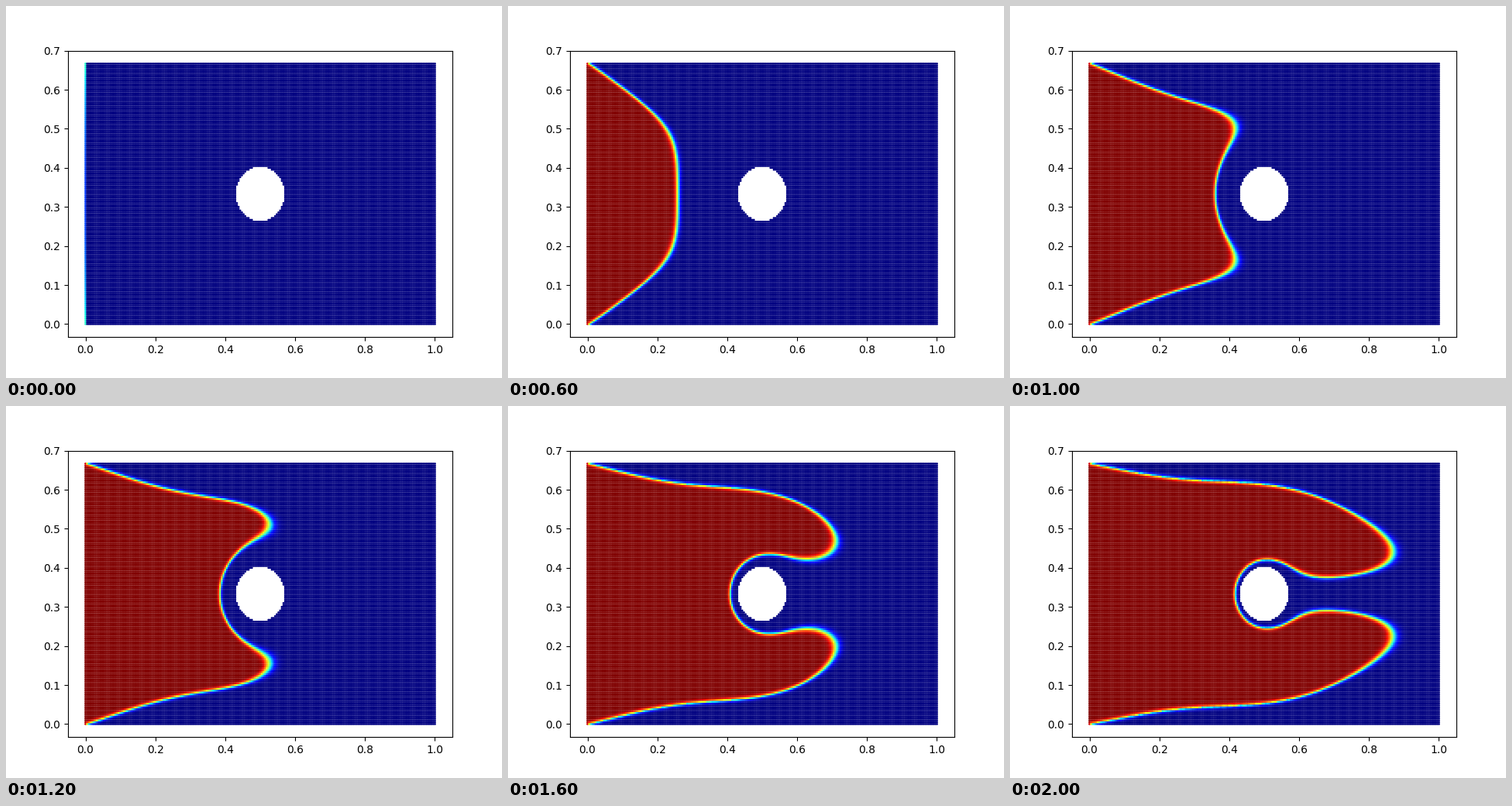
Write a matplotlib script that moves like this. It is 640 px wide and 480 px high and loops after 2.2 s.

```python
import numpy as np
import matplotlib.pyplot as plt
from matplotlib.animation import FuncAnimation

FRAMES, STEP = 11, 200
SUBSTEPS = 20
RADIUS, HALF = 0.07, 1 / 3      # cylinder radius, half height of the channel
CENTRE = 0.5 + 1j * HALF
PEAK = 0.092                    # inlet speed on the centre line, per frame
SPREAD = 1.7e-4                 # strength of the smearing across the front
N = 210                         # dots per unit length


def modes(z):
    """Slow viscous flows u - iv around the origin, even in x and y."""
    cols = [-2 * np.log(np.abs(z)) + z.conj() / z]
    for k in range(-12, 22, 2):
        w = (z / (RADIUS if k < 0 else 0.6)) ** k
        cols += [w, k * w * z.conj() / z - w.conj()]
    return np.stack(cols, axis=-1)


def solve_flow():
    """Fit the modes: parabolic inlet, no slip on wall and cylinder."""
    s = np.linspace(0, 1, 150)
    wall = -0.5 * s + 1j * HALF
    inlet = -0.5 + 1j * HALF * s
    disc = RADIUS * np.exp(0.5j * np.pi * s)
    a = modes(np.concatenate([wall, inlet, disc]))
    speed = np.concatenate([0 * s, PEAK * (1 - s**2), 0 * s])
    rows = np.vstack([a.real, a.imag])
    return np.linalg.lstsq(rows, np.r_[speed, 0 * speed], rcond=None)[0]


COEF = solve_flow()


def velocity(z):
    return (modes(z) @ COEF).conj()


def carry_front():
    """Front line, its normal and its blur width at every frame."""
    z = -0.494 + 1j * HALF * np.linspace(0, 1, 800) ** 1.6
    length = np.abs(np.gradient(z))
    smear = np.zeros(len(z))
    dt = 1 / SUBSTEPS
    states = []
    for n in range((FRAMES - 1) * SUBSTEPS + 1):
        along = np.gradient(z)
        stretch = np.abs(along) / length
        normal = -1j * along / np.abs(along)
        if n % SUBSTEPS == 0:
            width = np.clip(np.sqrt(smear) / stretch, 0.005, 0.02)
            states.append((z, normal, width))
        v = velocity(z)
        rate = np.abs(v.real) * normal.real**2 + np.abs(v.imag) * normal.imag**2
        smear = smear + 2 * SPREAD * rate * stretch**2 * dt
        z = z + dt * velocity(z + 0.5 * dt * v)
    return states


# Grid of dots with a round hole
gx, gy = np.meshgrid(np.arange(N + 1) / N, np.arange(2 * N // 3 + 1) / N,
                     indexing="ij")
keep = np.hypot(gx - 0.5, gy - HALF) > RADIUS
x, y = gx[keep], gy[keep]
spots = x - 0.5 + 1j * np.abs(y - HALF)     # folded onto the upper half


def nearest(line):
    return np.concatenate([
        np.argmin((p.real[:, None] - line.real)**2
                  + (p.imag[:, None] - line.imag)**2, axis=1)
        for p in np.array_split(spots, 60)])


def field(state):
    line, normal, width = state
    k = nearest(line)
    gap = spots - line[k]
    side = np.sign((gap * normal[k].conj()).real)
    return 0.5 - 0.5 * np.tanh(side * np.abs(gap) / width[k])


first = np.where(x == 0, 0.18 + 0.22 * (y / HALF - 1)**2, 0)
fields = [first] + [field(s) for s in carry_front()[1:]]

fig, ax = plt.subplots(figsize=(6.4, 4.8), dpi=100)
dots = ax.scatter(x, y, s=1, c=first, cmap="jet", vmin=0, vmax=1)
ax.set_xlim(-0.05, 1.05)
ax.set_ylim(-0.1 * HALF, 2.1 * HALF + 1e-9)


def draw(i):
    dots.set_array(fields[i])
    return dots,


anim = FuncAnimation(fig, draw, frames=FRAMES, interval=STEP, repeat=True)
plt.show()
```
